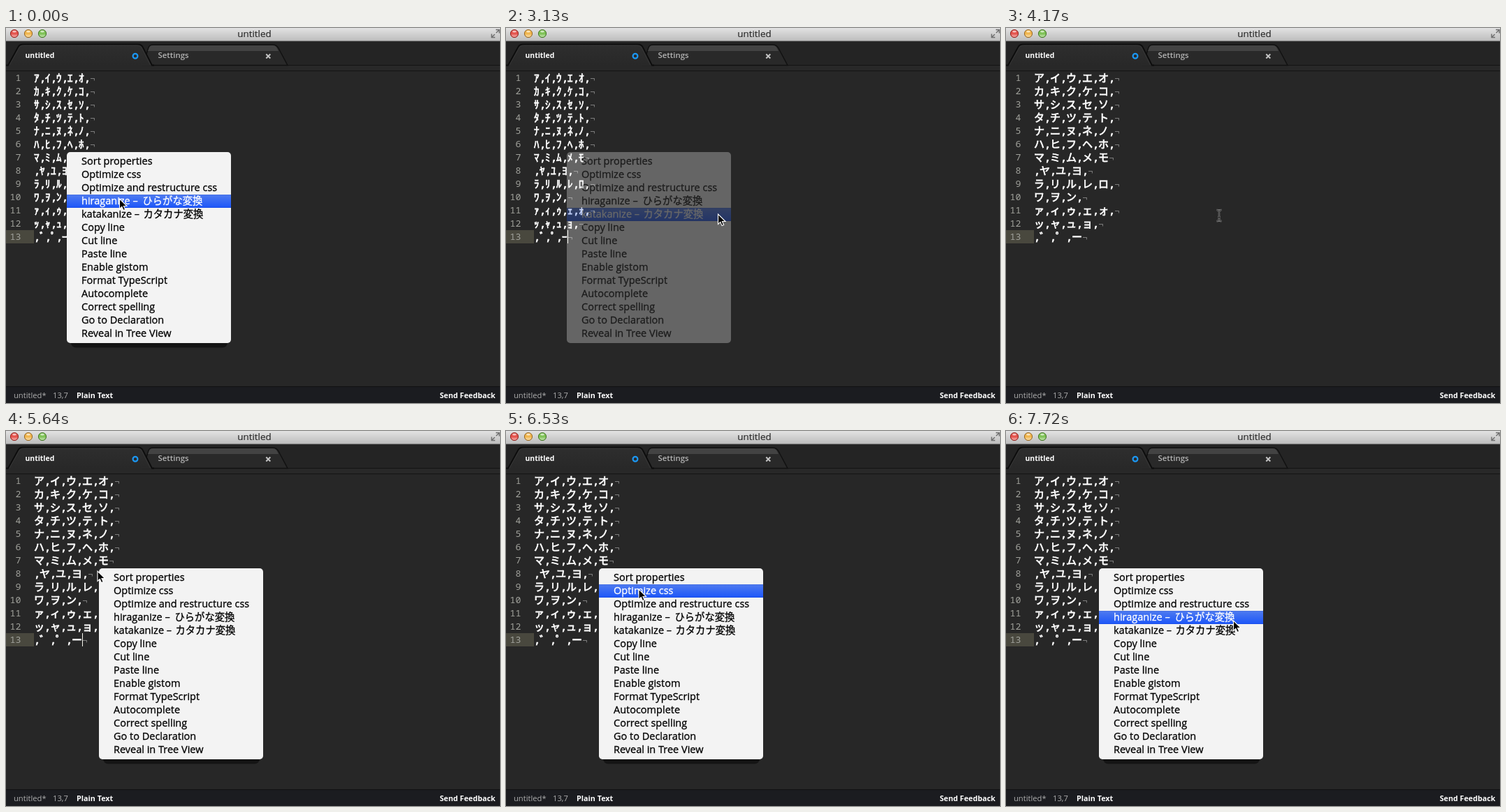
An HTML page that plays this animation: 707x538 px, repeating every 8000 ms.

```html
<!DOCTYPE html>
<html lang="ja">
<head>
<meta charset="utf-8">
<title>untitled</title>
<style>
html, body { margin: 0; width: 100%; height: 100%; overflow: hidden; background: #272727; }
svg { display: block; width: 100%; height: 100%; }
text { white-space: pre; }
.ui { font-family: "Open Sans", "Noto Sans", "Noto Sans CJK JP", sans-serif; }
.small { font-size: 11.2px; }
.bold { font-size: 10.75px; font-weight: 700; fill: #fff; }
.code { font: 15px "Noto Sans Mono", "Noto Sans CJK JP", "Noto Sans CJK", monospace; fill: #fff; stroke: #fff; stroke-width: .75; }
.code .eol { fill: #868686; stroke: none; font-size: 13.3px; }
.num { font: 13.3px "Noto Sans Mono", monospace; fill: #a0a19b; text-anchor: end; }
.item { font-size: 14.5px; stroke-width: .3; }
</style>
</head>
<body>
<svg viewBox="0 0 707 538" preserveAspectRatio="none" class="ui">
  <defs>
    <linearGradient id="bar" x2="0" y2="1">
      <stop stop-color="#e2e2e2"/><stop offset="1" stop-color="#bcbcbc"/>
    </linearGradient>
    <linearGradient id="tab" x2="0" y2="1">
      <stop stop-color="#2e2e2e"/><stop offset="1" stop-color="#282828"/>
    </linearGradient>
    <linearGradient id="blue" x2="0" y2="1">
      <stop stop-color="#4068dc"/><stop offset=".06" stop-color="#4c79f0"/>
      <stop offset=".94" stop-color="#1f58f8"/><stop offset="1" stop-color="#1848de"/>
    </linearGradient>
    <linearGradient id="gloss" x2="0" y2="1">
      <stop stop-color="#fff" stop-opacity=".1"/><stop offset=".5" stop-color="#fff" stop-opacity=".05"/>
      <stop offset="1" stop-color="#fff" stop-opacity=".6"/>
    </linearGradient>
  </defs>

  <rect width="707" height="538" fill="#272727"/>

  <!-- title bar -->
  <rect width="707" height="19" fill="url(#bar)"/>
  <rect y="18.5" width="707" height="1" fill="#555"/>
  <g id="lights"></g>
  <text x="355.5" y="13" font-size="13.4" text-anchor="middle" fill="#2c2c2c" stroke="#2c2c2c" stroke-width=".2">untitled</text>
  <path d="M701 2.500h5v5M706 2.500l-4.500 4.500M695 8.500v5h5M695 13.500l4.500-4.500" fill="none" stroke="#707070" stroke-width="1.500"/>

  <!-- tabs -->
  <rect y="19.500" width="707" height="34.500" fill="#242424"/>
  <rect y="54" width="707" height="8" fill="#282828"/>
  <path d="M0 53.500H707" stroke="#141414"/>
  <path d="M196 53.500L204 28q2-4 6-4H382q5 0 8 5l13 24.500z" fill="#292929" stroke="#111" stroke-width="1.500"/>
  <path d="M203 33l2-5q1-3 5-3H382q4 0 6 4l2 4z" fill="#434343"/>
  <path d="M0 54.500L3 53 17 28q2-4.500 7-4.500H189q5 0 7 4.500l13 25 3 1.500z" fill="url(#tab)"/>
  <path d="M0 53.500h3L17 28q2-4.500 7-4.500H189q5 0 7 4.500l13 25.500h3" fill="none" stroke="#0c0c0c" stroke-width="1.800"/>
  <path d="M5 53L18.500 29q2-4 6-4H188.500q4 0 6 4l12 24" fill="none" stroke="#3a3a3a" stroke-width=".8"/>
  <path d="M0 61.500H707" stroke="#141414"/>
  <text x="27.500" y="43" class="bold" style="font-size:10.400px">untitled</text>
  <circle cx="185" cy="40.300" r="3.400" fill="none" stroke="#1b98f5" stroke-width="2.200"/>
  <text x="217.500" y="43" font-size="11.400" font-weight="600" fill="#b5b5b5">Settings</text>
  <path d="M372.300 37.500l6 6m0-6l-6 6" stroke="#c2c2c2" stroke-width="2"/>

  <!-- editor -->
  <rect y="290" width="40" height="19" fill="#49483e"/>
  <g id="nums"></g>
  <g id="narrow" class="code"></g>
  <g id="wide" class="code"></g>
  <rect id="caret" y="290" width="1" height="19" fill="#f8f8f0"/>

  <!-- status bar -->
  <rect y="514" width="707" height="24" fill="#1b1c20"/>
  <path d="M0 514.500H707" stroke="#111"/>
  <g class="small" fill="#adadad">
    <text x="11" y="531">untitled*</text>
    <text x="67" y="531">13,7</text>
  </g>
  <text x="101" y="531" class="bold">Plain Text</text>
  <text x="700.500" y="531" class="bold" text-anchor="end">Send Feedback</text>

  <g id="menu">
    <rect id="shadow" x="6" y="20" width="224" height="260.500" rx="7" fill="#141414"/>
    <rect width="235" height="274" rx="5" fill="#f3f3f3"/>
    <rect id="mark" width="235" height="19" fill="url(#blue)"/>
    <g id="items"></g>
  </g>
  <path id="arrow" d="M0 0V14.500l3.300-3.100 2.300 5.200 2.600-1.100-2.300-5h4.700z" fill="#000" stroke="#fff" stroke-width="1.100"/>
  <g id="beam" fill="none">
    <path d="M-3.500-8q3 0 3.500 1.500 .5-1.500 3.500-1.500M0-6.500v13M-3.500 8q3 0 3.500-1.500 .5 1.500 3.500 1.500M-2 2.500h4" stroke="#8c8c8c" stroke-width="2.400"/>
    <path d="M-3.500-8q3 0 3.500 1.500 .5-1.500 3.500-1.500M0-6.500v13M-3.500 8q3 0 3.500-1.500 .5 1.500 3.500 1.500M-2 2.500h4" stroke="#1c1c1c" stroke-width="1"/>
  </g>
</svg>
<script>
const LOOP = 8000;
const $ = id => document.getElementById(id);

function add(parent, tag, attrs, text) {
  const el = document.createElementNS('http://www.w3.org/2000/svg', tag);
  for (const k in attrs) el.setAttribute(k, attrs[k]);
  if (text) el.textContent = text;
  return parent.appendChild(el);
}

const narrowRows = 'ｱ,ｲ,ｳ,ｴ,ｵ,|ｶ,ｷ,ｸ,ｹ,ｺ,|ｻ,ｼ,ｽ,ｾ,ｿ,|ﾀ,ﾁ,ﾂ,ﾃ,ﾄ,|ﾅ,ﾆ,ﾇ,ﾈ,ﾉ,|ﾊ,ﾋ,ﾌ,ﾍ,ﾎ,|ﾏ,ﾐ,ﾑ,ﾒ,ﾓ|,ﾔ,ﾕ,ﾖ,|ﾗ,ﾘ,ﾙ,ﾚ,ﾛ,|ﾜ,ｦ,ﾝ,|ｧ,ｨ,ｩ,ｪ,ｫ,|ｯ,ｬ,ｭ,ｮ,|,ﾞ,ﾟ,ｰ';
const wideRows = 'ア,イ,ウ,エ,オ,|カ,キ,ク,ケ,コ,|サ,シ,ス,セ,ソ,|タ,チ,ツ,テ,ト,|ナ,ニ,ヌ,ネ,ノ,|ハ,ヒ,フ,ヘ,ホ,|マ,ミ,ム,メ,モ|,ヤ,ユ,ヨ,|ラ,リ,ル,レ,ロ,|ワ,ヲ,ン,|ァ,ィ,ゥ,ェ,ォ,|ッ,ャ,ュ,ョ,|,゛,゜,ー';

// Every glyph sits on the editor's column grid
function layRows(group, rows, kanaWidth) {
  rows.split('|').forEach((row, i) => {
    const y = 76.5 + 19 * i;
    let x = 40;
    for (const ch of row) {
      add(group, 'text', { x, y }, ch);
      x += ch === ',' ? 8 : kanaWidth;
    }
    add(group, 'text', { x, y, class: 'eol' }, '¬');
  });
}
layRows($('narrow'), narrowRows, 8);
layRows($('wide'), wideRows, 15);
for (let i = 0; i < 13; i++) add($('nums'), 'text', { x: 21.5, y: 76 + 19 * i, class: 'num' }, i + 1);

[['#e2463f', '#8f2a25'], ['#efb03f', '#94672a'], ['#74bd48', '#44762a']].forEach(([fill, stroke], i) => {
  const cx = 12 + 20 * i;
  add($('lights'), 'circle', { cx, cy: 8, r: 5.6, fill, stroke });
  add($('lights'), 'circle', { cx, cy: 8, r: 4.8, fill: 'url(#gloss)' });
  add($('lights'), 'ellipse', { cx, cy: 4.9, rx: 2.8, ry: 1.5, fill: '#fff', opacity: .6 });
});

const labels = ['Sort properties', 'Optimize css', 'Optimize and restructure css', 'hiraganize –|ひらがな変換',
  'katakanize –|カタカナ変換', 'Copy line', 'Cut line', 'Paste line', 'Enable gistom', 'Format TypeScript',
  'Autocomplete', 'Correct spelling', 'Go to Declaration', 'Reveal in Tree View'];
const items = labels.map((label, i) => {
  const g = add($('items'), 'g', { class: 'item' });
  const [name, kana] = label.split('|');
  const y = 18 + 19 * i;
  add(g, 'text', { x: 21, y }, name);
  if (kana) add(g, 'text', { x: i === 3 ? 108.5 : 109.5, y, 'font-size': 14.3 }, kana);
  return g;
});

// Pointer: start time, x, y, shape, chosen menu row
const pointer = [
  [0, 162.5, 245, 'arrow', 3], [290, 162.5, 254, 'arrow', 3], [440, 162, 265, 'arrow', 4],
  [1030, 180, 265, 'arrow', 4], [1180, 232, 267, 'arrow', 4], [1330, 285, 268, 'arrow', 4],
  [1480, 303.5, 267, 'arrow', 4],
  [3280, 305, 269, 'beam', -1], [4320, 240, 243, 'beam', -1], [4460, 150, 209, 'beam', -1],
  [4610, 110.5, 195, 'beam', -1], [4910, 122, 200, 'beam', -1], [5050, 131, 203, 'beam', -1],
  [5640, 131, 201, 'arrow', -1], [6380, 146, 207, 'arrow', 0], [6530, 190, 227, 'arrow', 1],
  [6680, 235, 249, 'arrow', 2], [6820, 265.5, 261, 'arrow', 3], [6970, 292, 268, 'arrow', 3],
  [7120, 310, 272, 'arrow', 3], [7270, 316, 273, 'arrow', 3], [7570, 321, 273, 'arrow', 3],
  [7720, 325.5, 272, 'arrow', 3]
];
const caretOn = [[0, 3280], [3720, 4170], [4610, 5050], [5350, 5790]];

const show = (el, on) => el.setAttribute('visibility', on ? 'visible' : 'hidden');
const move = (el, x, y) => el.setAttribute('transform', `translate(${x} ${y})`);

function draw(t) {
  const [, x, y, shape, row] = pointer.findLast(p => p[0] <= t);
  for (const id of ['arrow', 'beam']) {
    show($(id), id === shape);
    move($(id), x, y);
  }

  const converted = t >= 3280;
  show($('narrow'), !converted);
  show($('wide'), converted);
  $('caret').setAttribute('x', converted ? 109 : 88);
  show($('caret'), caretOn.some(([a, b]) => t >= a && t < b));

  const fading = t >= 3130 && !converted;
  show($('menu'), !converted || t >= 5640);
  $('menu').setAttribute('opacity', fading ? .3 : 1);
  $('shadow').setAttribute('opacity', fading ? 0 : 1);
  if (converted) move($('menu'), 133, 197);
  else move($('menu'), 87, 178);

  $('mark').setAttribute('y', 4 + 19 * row);
  $('mark').setAttribute('opacity', row < 0 ? 0 : 1);
  items.forEach((g, i) => {
    const color = i === row ? '#fff' : '#000';
    g.setAttribute('fill', color);
    g.setAttribute('stroke', color);
  });
}

const start = performance.now();
function tick() {
  draw((performance.now() - start) % LOOP);
  requestAnimationFrame(tick);
}
draw(0);
requestAnimationFrame(tick);
</script>
</body>
</html>
```
